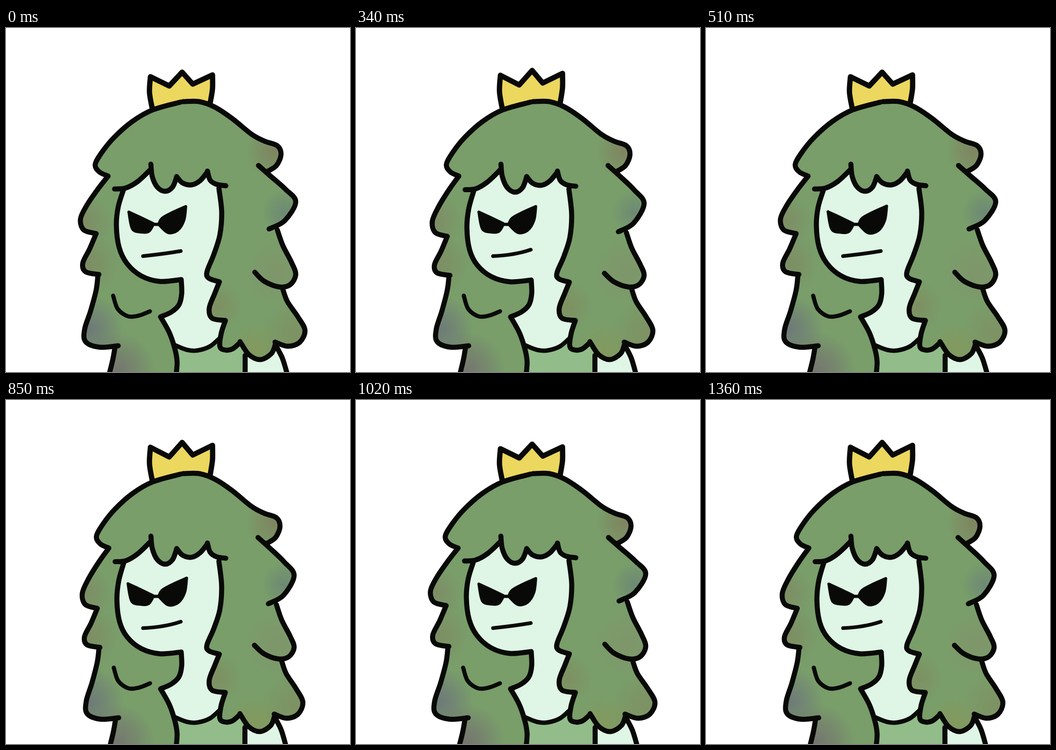
Animation, 748 px wide and 748 px high, one loop 1530 ms. Source, as an HTML page with a canvas:

```html
<!DOCTYPE html>
<html lang="en">
<head>
<meta charset="utf-8">
<title>Grumpy queen</title>
<style>
html, body { margin: 0; width: 100%; height: 100%; overflow: hidden; background: #fff; }
canvas { display: block; }
</style>
</head>
<body>
<canvas id="stage" width="748" height="748"></canvas>
<script>
const ctx = document.getElementById('stage').getContext('2d');
const SIZE = 748, STEP = 170, STEPS = 9;
const INK = '#090a08', HAIR = '#799e6a', SKIN = '#dff5e5', DRESS = '#92bc89', GOLD = '#ecd75f';

// Key points on smooth curves; a slash marks a corner.
const crown = '318,175 312,140 314,106/314,106 355,126/355,126 383,96/383,96 406,122/406,122 449,102/449,102 449,132 444,163';
const leftLocks = '224,754 232,722 237,694/244,691 203,694 173,682 171,655 184,615 196,570 200,536/202,536 173,530 167,511 182,480 196,447/196,447 169,439 162,415 176,385 200,350 222,322';
const cap = '222,322 203,313 194,297 208,271 235,238 275,203 319,178 380,161/385,160 420,160 454,172 492,197 534,231 562,246 590,256 598,275 588,299 568,312';
const rightLocks = '549,299 574,321 607,350 630,378 606,419 572,437/590,439 602,473 621,510 630,536 618,558 594,563 562,551 541,531/602,568 612,595 634,627 650,657 639,683 613,692 585,683/586,687 577,708 553,721 528,710 509,682';
const neckLocks = '509,684 492,698 475,700 465,692 468,664 477,636/477,636 448,631 442,609 454,577 464,552/464,552 441,544 437,530 452,492 465,450 469,400 463,349';
const fringe = '478,343 458,340 444,331 438,311/438,313 422,332 404,341 384,337 371,323/371,324 362,346 346,355 329,346 318,323 315,296/314,308 286,334 260,348 236,350';
const jaw = '256,350 244,389 240,430 246,477 263,512 294,539 334,551 381,547/381,547 382,578 376,602 359,618 336,628/336,628 355,662 367,697 372,725 370,754';
const hair = [leftLocks, cap, rightLocks, neckLocks, fringe, jaw].join('/');
const strand = '233,582 243,611 266,627 290,625 313,616';
const collar = '368,690 394,700 417,701 444,692 465,674';
const arm = '587,691 601,718 612,754';
const seam = '520,712 520,754';
const lenses = [
  '267,400 293,412 320,425/320,428 311,442 296,444 275,437 267,400',
  '333,424 340,413 364,400 391,388/391,388 387,418 373,440 352,445 333,428'
];

// How far each of the three redraws strays from the first
const poses = [{ drop: 0, lift: 0 }, { drop: 4, lift: 0.08 }, { drop: 6, lift: 0.05 }];

const tints = [
  ['#6c727b', 180, 655, 75], ['#746e70', 240, 745, 85],
  ['#80805e', 582, 268, 60], ['#6b8575', 606, 402, 50],
  ['#7e8a64', 172, 420, 60], ['#7e8a62', 180, 512, 65],
  ['#80946a', 590, 530, 75], ['#7f8d61', 460, 605, 55],
  ['#7f8f62', 630, 665, 75], ['#84985c', 540, 700, 60]
];

// The sides pull inwards and the middle locks sag a little.
function wobble([x, y], { drop }) {
  const pull = drop ? 4 * ((x - 400) / 240) ** 3 : 0;
  const sag = y > 330 && y < 560 ? drop * Math.sin(Math.PI * (y - 330) / 230) : 0;
  return [x - pull, y + sag];
}

const stretchCrown = ([x, y], { lift }) => [x, 170 + (y - 170) * (1 + lift)];

const parse = text => text.split('/').map(piece => piece.split(' ').map(p => p.split(',').map(Number)));

function addCurve(path, pts) {
  const at = i => pts[Math.max(0, Math.min(pts.length - 1, i))];
  const handle = (i, dir) => at(i).map((v, k) => v + dir * (at(i + 1)[k] - at(i - 1)[k]) / 6);
  for (let i = 0; i < pts.length - 1; i++) {
    path.bezierCurveTo(...handle(i, 1), ...handle(i + 1, -1), ...at(i + 1));
  }
}

// Open pieces for inking, or one joined outline for filling
function trace(text, joined, warp = p => p) {
  const path = new Path2D();
  parse(text).forEach((piece, i) => {
    const pts = piece.map(warp);
    if (joined && i) path.lineTo(...pts[0]);
    else path.moveTo(...pts[0]);
    addCurve(path, pts);
  });
  return path;
}

function ink(path, width) {
  ctx.lineWidth = width;
  ctx.strokeStyle = INK;
  ctx.stroke(path);
}

function paint(path, color) {
  ctx.fillStyle = color;
  ctx.fill(path);
}

function paintHair(shape) {
  ctx.save();
  ctx.clip(shape);
  ctx.fillStyle = HAIR;
  ctx.fillRect(0, 0, SIZE, SIZE);
  for (const [color, x, y, r] of tints) {
    const glow = ctx.createRadialGradient(x, y, 0, x, y, r);
    glow.addColorStop(0, color + 'd8');
    glow.addColorStop(0.5, color + '78');
    glow.addColorStop(1, color + '00');
    ctx.fillStyle = glow;
    ctx.fillRect(x - r, y - r, 2 * r, 2 * r);
  }
  ctx.restore();
}

function drawFace(step) {
  const grow = step % 2 ? 1.03 : 1;
  const resize = ([x, y]) => [328 + (x - 328) * grow, 420 + (y - 420) * grow];
  for (const lens of lenses) {
    const shape = trace(lens, true, resize);
    paint(shape, INK);
    ink(shape, 6);
  }
  ink(trace('318,427 335,427'), 7);

  const smile = step % 3 ? 3 : 0;
  const mouth = new Path2D();
  mouth.moveTo(298, 496);
  mouth.quadraticCurveTo(345, 491 + smile, 380, 485 - smile);
  ink(mouth, 8);
}

function draw(step) {
  const pose = poses[step % 3];
  const shape = (text, joined) => trace(text, joined, p => wobble(p, pose));
  ctx.fillStyle = '#fff';
  ctx.fillRect(0, 0, SIZE, SIZE);
  ctx.lineCap = ctx.lineJoin = 'round';

  const crownShape = trace(crown, true, p => stretchCrown(p, pose));
  paint(crownShape, GOLD);
  ink(crownShape, 11.5);

  paint(trace('245,320 475,320/480,710 345,710/340,600 245,540', true), SKIN);
  paint(shape(collar + '/520,690 520,754/360,754 360,700', true), DRESS);
  paint(shape(arm + '/520,754 520,690', true), SKIN);
  ink(shape(collar), 9.5);
  ink(shape(seam), 11);
  ink(shape(arm), 11);

  paintHair(shape(hair, true));
  ink(shape(hair), 11);
  ink(shape(strand), 9);
  drawFace(step);
}

let shown = -1;
function tick() {
  const step = Math.floor(performance.now() / STEP) % STEPS;
  if (step !== shown) draw(shown = step);
  requestAnimationFrame(tick);
}
tick();
</script>
</body>
</html>
```
